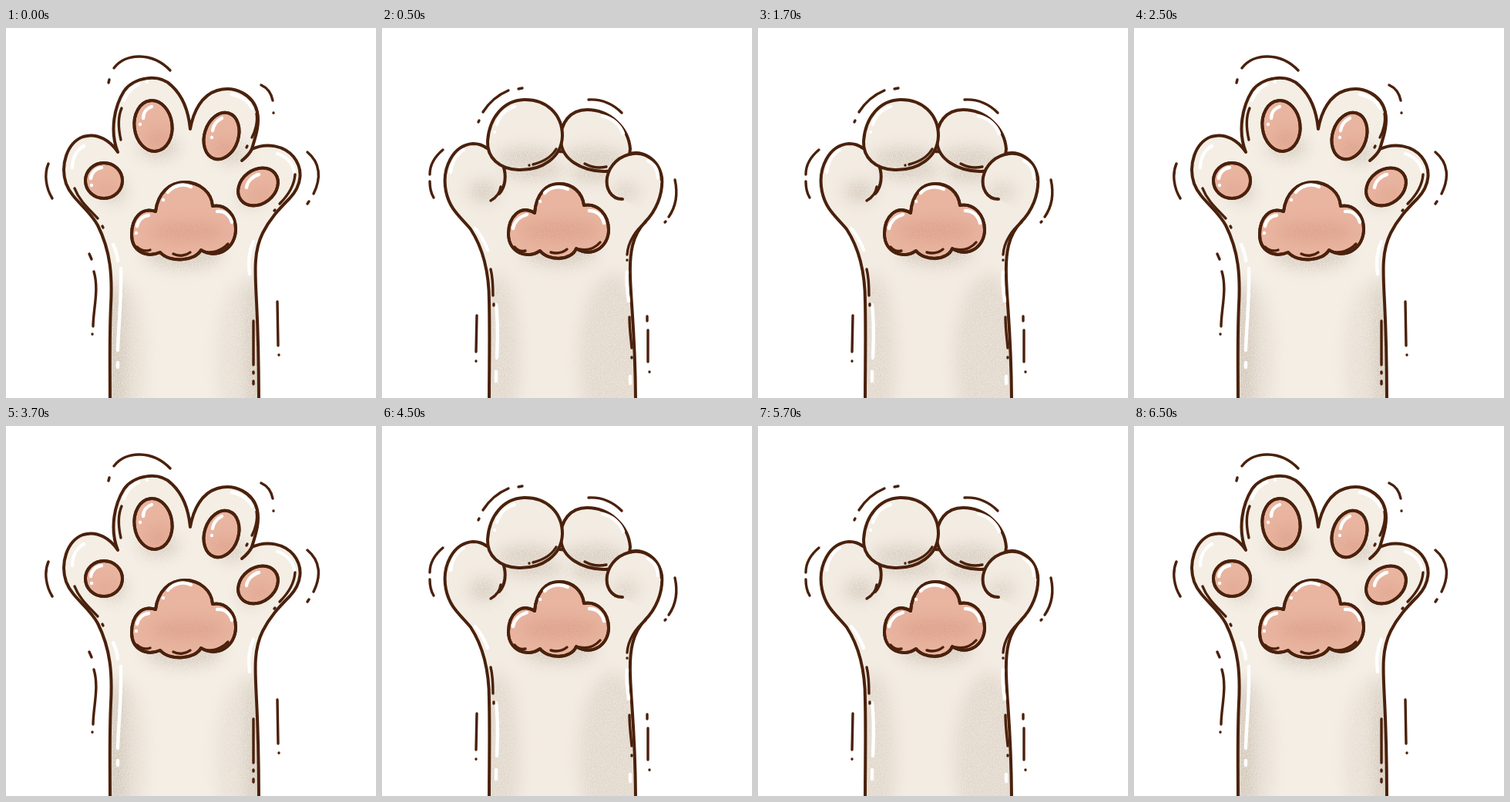
Animation, 480 px wide and 480 px high, one loop 8 s. Source, as an HTML page:

```html
<!DOCTYPE html>
<html lang="en">
<head>
<meta charset="utf-8">
<title>Cat paw</title>
<style>
html, body { margin: 0; width: 100%; height: 100%; overflow: hidden; background: #fff; }
svg { display: block; width: 100vw; height: 100vh; }
path, ellipse { stroke-linecap: round; stroke-linejoin: round; }
.line { fill: none; stroke: #4a210c; stroke-width: 4; }
.thin { fill: none; stroke: #4a210c; stroke-width: 3.4; }
.gloss { fill: none; stroke: #fff; stroke-width: 4.4; }
.pad { fill: #e9b5a0; stroke: #4a210c; stroke-width: 3.8; }
.fur { fill: #f4eee5; }
.fist .fur { fill: #f3ece3; }
.shade { fill: #c9bcae; filter: url(#grain); }
.blush { fill: #d3937d; filter: url(#grain); }
.open { animation: open 4s step-end infinite; }
.fist { animation: fist 4s step-end infinite; }
@keyframes open { 0% { visibility: visible } 12.5% { visibility: hidden } 62.5% { visibility: visible } }
@keyframes fist { 0% { visibility: hidden } 12.5% { visibility: visible } 62.5% { visibility: hidden } }
</style>
</head>
<body>
<svg viewBox="0 0 480 480">
<defs>
  <!-- soft airbrush with a light speckle -->
  <filter id="grain" x="-60%" y="-60%" width="220%" height="220%" color-interpolation-filters="sRGB">
    <feGaussianBlur in="SourceGraphic" stdDeviation="9" result="soft"/>
    <feTurbulence type="fractalNoise" baseFrequency=".7" numOctaves="2" seed="4"/>
    <feColorMatrix values="0 0 0 0 0  0 0 0 0 0  0 0 0 0 0  1.6 0 0 0 -.1"/>
    <feComposite in="soft" operator="in"/>
  </filter>
  <path id="palm" d="M135 490C135 440 134 400 136 360C138 322 136 290 119 256C107 234 86 223 78 202C70 178 79 149 100 141C119 135 136 147 145 161C134 133 141 101 153 82C165 64 198 58 215 75C230 89 237 110 239 131C243 108 254 87 274 81C297 74 321 87 326 109C330 128 321 148 319 157C339 148 361 153 373 167C386 183 384 204 368 221C354 235 342 248 333 266C321 290 323 315 325 355C327 395 328 440 328 490Z"/>
  <path id="arm" d="M139 490C139 440 140 400 139 355C139 314 130 284 115 261C102 245 88 236 83 212C77 182 92 152 118 150C126 150 131 152 136 156L318 164C338 157 359 170 363 194C365 216 355 238 341 252C325 269 321 291 322 322C323 360 329 400 329 490Z"/>
  <path id="toeL" d="M184 93C212 92 234 111 234 140C233 168 208 185 177 184C152 183 136 168 137 147C139 116 158 94 184 93Z"/>
  <path id="toeR" d="M266 106C296 106 320 130 322 157C321 177 307 187 287 186C259 185 233 171 232 146C231 123 244 106 266 106Z"/>
  <path id="thumb" d="M326 163C345 161 362 176 363 198L335 235L311 222C296 222 290 207 292 194C295 178 308 165 326 163Z"/>
  <path id="padOpen" d="M194 238C197 214 212 200 232 200C252 200 267 214 268 231C286 228 298 243 298 261C298 286 274 301 253 288C245 303 212 305 200 291C181 299 163 289 163 268C163 246 176 232 194 238Z"/>
  <path id="padFist" d="M198 240C200 215 213 202 230 202C248 202 260 214 262 230C281 227 294 243 294 262C294 284 272 299 252 286C246 302 216 303 205 289C188 301 164 291 164 267C164 244 180 229 198 240Z"/>
  <ellipse id="p1" cx="191" cy="127" rx="24.5" ry="33" transform="rotate(-7 191 127)"/>
  <ellipse id="p2" cx="279.500" cy="140" rx="22" ry="31" transform="rotate(18 279.500 140)"/>
  <ellipse id="p3" cx="127" cy="198" rx="24" ry="23"/>
  <ellipse id="p4" cx="327" cy="206" rx="28" ry="22" transform="rotate(-38 327 206)"/>
  <clipPath id="inPalm"><use href="#palm"/></clipPath>
  <clipPath id="inArm"><use href="#arm"/></clipPath>
  <clipPath id="inToeL"><use href="#toeL"/></clipPath>
  <clipPath id="inToeR"><use href="#toeR"/></clipPath>
  <clipPath id="inThumb"><use href="#thumb"/></clipPath>
  <clipPath id="inPads"><use href="#padOpen"/><use href="#p1"/><use href="#p2"/><use href="#p3"/><use href="#p4"/></clipPath>
  <clipPath id="inPadFist"><use href="#padFist"/></clipPath>
</defs>

<g class="open">
  <use href="#palm" class="fur"/>
  <g clip-path="url(#inPalm)">
    <g class="shade" opacity=".75">
      <ellipse cx="198" cy="155" rx="26" ry="15"/>
      <ellipse cx="292" cy="162" rx="20" ry="14"/>
      <ellipse cx="139" cy="211" rx="17" ry="16"/>
      <ellipse cx="318" cy="220" rx="16" ry="12"/>
      <ellipse cx="230" cy="293" rx="50" ry="20"/>
      <ellipse cx="143" cy="430" rx="13" ry="100"/>
      <ellipse cx="322" cy="420" rx="10" ry="100"/>
    </g>
    <g class="shade" opacity=".3">
      <ellipse cx="150" cy="430" rx="32" ry="100"/>
      <ellipse cx="308" cy="430" rx="35" ry="100"/>
    </g>
  </g>
  <use href="#palm" class="line"/>
  <path class="line" d="M319 157C316 163 311 168 306 172"/>
  <g class="pad">
    <use href="#p1"/><use href="#p2"/><use href="#p3"/><use href="#p4"/><use href="#padOpen"/>
  </g>
  <g clip-path="url(#inPads)">
    <g class="blush" opacity=".6">
      <ellipse cx="198" cy="145" rx="18" ry="14"/>
      <ellipse cx="284" cy="157" rx="18" ry="12"/>
      <ellipse cx="131" cy="211" rx="15" ry="8"/>
      <ellipse cx="331" cy="217" rx="18" ry="8"/>
      <ellipse cx="235" cy="264" rx="50" ry="13"/>
    </g>
  </g>
  <g class="line">
    <use href="#p1"/><use href="#p2"/><use href="#p3"/><use href="#p4"/><use href="#padOpen"/>
  </g>
  <path class="gloss" d="M153 94C157 83 165 76 172 73M183 70h.1M293 86C307 89 315 96 319 104M86 181C86 168 92 158 101 153M352 163C365 167 373 177 374 187M139 281C143 290 145 296 145 302M149 312C150 350 146 385 145 418M145 434v6M321 277C315 290 314 305 316 319"/>
  <path class="gloss" d="M178 117C178 109 183 104 189 102M174 125v.1M268 133C269 126 274 120 280 117M267 142v.1M110 195C111 187 117 182 124 181M111 204v.1M312 207C313 199 320 192 328 190M210 213C217 204 230 201 240 206M204 223v.1M170 257C172 248 178 244 185 243M169 266v.1M274 238C284 237 291 244 293 252"/>
  <path class="thin" d="M150 104C144 118 146 132 149 145M325 111C327 122 323 135 319 142M313 153l-1 2M89 208C95 224 108 235 119 247M125 257l1 2M375 190C374 205 365 218 355 228M349 236l-1 1M321 380V437M321 446v2M321 458v4M170 284C175 289 181 290 187 288M217 293C225 297 234 295 239 291M256 290C267 293 280 289 288 280"/>
  <path class="thin" d="M140 52C155 32 190 31 213 55M134 67l-1 4M331 74C340 78 344 84 346 94M347 110v.2M391 161C408 175 409 195 399 215M393 225l-2 3M55 176C49 190 52 208 60 221M108 293l3 7M114 316C121 340 113 365 113 387M112 397v.2M352 355L353 412M354 424v.2"/>
</g>

<g class="fist">
  <use href="#arm" class="fur"/>
  <g clip-path="url(#inArm)">
    <g class="shade" opacity=".75">
      <ellipse cx="132" cy="212" rx="20" ry="14"/>
      <ellipse cx="195" cy="184" rx="40" ry="12"/>
      <ellipse cx="274" cy="188" rx="30" ry="12"/>
      <ellipse cx="230" cy="291" rx="48" ry="18"/>
    </g>
    <g class="shade" opacity=".45">
      <ellipse cx="150" cy="430" rx="28" ry="110"/>
      <ellipse cx="300" cy="430" rx="45" ry="110"/>
    </g>
  </g>
  <use href="#arm" class="line"/>
  <path class="line" d="M157 178C162 192 160 206 152 215"/>

  <use href="#toeR" class="fur"/>
  <g clip-path="url(#inToeR)"><ellipse class="shade" opacity=".7" cx="274" cy="170" rx="42" ry="16"/></g>
  <use href="#toeR" class="line"/>
  <use href="#toeL" class="fur"/>
  <g clip-path="url(#inToeL)"><ellipse class="shade" opacity=".7" cx="190" cy="169" rx="42" ry="15"/></g>
  <use href="#toeL" class="line"/>
  <use href="#thumb" class="fur"/>
  <g clip-path="url(#inThumb)"><ellipse class="shade" opacity=".6" cx="316" cy="212" rx="18" ry="12"/></g>
  <path class="line" d="M363 198C362 176 345 161 326 163C308 165 295 178 292 194C290 207 296 222 312 222"/>

  <use href="#padFist" class="pad"/>
  <g clip-path="url(#inPadFist)"><ellipse class="blush" opacity=".6" cx="231" cy="263" rx="52" ry="14"/></g>
  <use href="#padFist" class="line"/>
  <path class="gloss" d="M149 125C152 113 160 106 172 102M146 135v.1M286 114C299 117 309 126 313 137M89 187C91 172 97 163 106 158M345 172C354 177 358 185 358 194M121 260C129 270 134 279 137 288M148 359C151 383 150 405 149 428M148 446v12M318 316C317 329 318 342 320 354M322 452v9"/>
  <path class="gloss" d="M211 214C218 206 231 204 241 209M205 225v.1M170 260C172 250 178 245 188 242M269 237C279 237 286 244 288 253"/>
  <path class="thin" d="M196 177C208 174 220 167 226 157M191 178v.2M263 176C272 181 282 182 291 180M154 206C153 214 148 220 141 224M342 252C329 262 319 278 318 294M318 301v.2M141 313C144 325 144 336 144 347M145 358v2M321 375C321 390 323 404 324 415M324 427v1M172 284C176 289 181 290 186 289M219 291C227 293 235 291 240 287M256 287C266 289 276 286 283 278"/>
  <path class="thin" d="M131 109C140 95 152 86 164 81M126 120l-1 2M177 79l5 -1M268 93C285 92 300 99 311 110M79 158C67 168 62 180 62 190M62 199C62 208 64 215 67 220M380 197C384 215 381 232 372 245M368 251l-1 1M123 373L122 420M122 432v.2M344 374v6M345 392V433M347 446v.2"/>
</g>
</svg>
</body>
</html>
```
